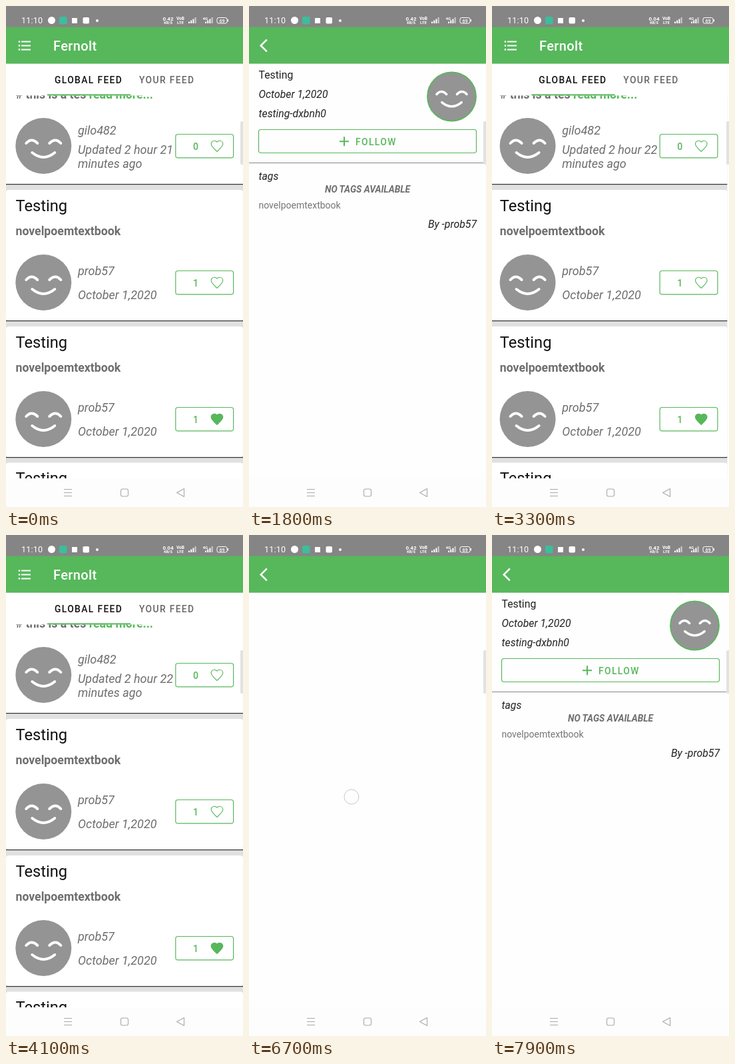
Animation of 356x752 px, one loop 8 s. Source, as an HTML page:

```html
<!DOCTYPE html>
<html lang="en">
<head>
<meta charset="utf-8">
<title>Feed</title>
<style>
  html, body { margin: 0; width: 100%; height: 100%; overflow: hidden; background: #fefefe; }
  svg { display: block; width: 356px; height: 752px; font-family: Roboto, Arial, sans-serif; }
  .i { font-style: italic; }
  .b { font-weight: 700; }
  .m { font-weight: 500; }
</style>
</head>
<body>
<svg id="stage" viewBox="0 0 356 752" xmlns="http://www.w3.org/2000/svg"></svg>
<script>
const LOOP = 8000, STEP = 100;
const GREEN = '#57b75b', GREY = '#6e6e6e', INK = '#222';
const USER = 'prob57';

const text = (x, y, size, fill, str, cls = '', more = '') =>
  `<text x="${x}" y="${y}" font-size="${size}" fill="${fill}" class="${cls}" ${more}>${str}</text>`;
const rect = (x, y, w, h, fill, more = '') =>
  `<rect x="${x}" y="${y}" width="${w}" height="${h}" fill="${fill}" ${more}/>`;
const line = (d, stroke, width, more = '') =>
  `<path d="${d}" fill="none" stroke="${stroke}" stroke-width="${width}" ${more}/>`;
const circle = (x, y, r, fill, more = '') =>
  `<circle cx="${x}" cy="${y}" r="${r}" fill="${fill}" ${more}/>`;

const avatar = (x, y, k, ring = '') =>
  `<g transform="translate(${x} ${y}) scale(${k})">` + circle(0, 0, 42, '#949494', ring) +
  line('M-26-4Q-18-13-9-4M9-4Q18-13 26-4M-17 10Q0 24 17 10', '#fff', 4, 'stroke-linecap="round"') + '</g>';

const HEART = 'M12 20.3L10.6 19C5.4 14.4 2 11.3 2 7.5C2 4.4 4.4 2 7.5 2C9.2 2 10.9 2.8 12 4.1' +
  'C13.1 2.8 14.8 2 16.5 2C19.6 2 22 4.4 22 7.5C22 11.3 18.6 14.4 13.4 19Z';

// Like button; the ripple grows from the touch point inside the button.
const likeButton = (id, y) =>
  `<clipPath id="clip-${id}">${rect(255, y, 87, 35.5, '#000', 'rx="4"')}</clipPath>` +
  `<g clip-path="url(#clip-${id})">${circle(309, y + 17, 0, GREEN, `id="ripple-${id}" opacity=".14"`)}</g>` +
  rect(254.8, y, 86.8, 35.4, 'none', `rx="3.5" stroke="${GREEN}" stroke-width="1.2"`) +
  text(285, y + 23, 14, GREEN, '', 'm', `id="count-${id}" text-anchor="middle"`) +
  `<path id="heart-${id}" d="${HEART}" transform="translate(306.4 ${y + 8}) scale(.88)" stroke="${GREEN}" stroke-width="1.3"/>`;

const title = y => text(14.5, y + 31.5, 23.7, '#111', 'Testing');

const card = (id, y) =>
  rect(0, y, 356, 196, '#fff', 'rx="4"') + title(y) +
  text(14.5, y + 67.5, 17.7, GREY, 'novelpoemtextbook', 'b') +
  avatar(56.3, y + 139, 1) +
  text(108, y + 128, 18, GREY, USER, 'i') +
  text(108, y + 164, 18, GREY, 'October 1,2020', 'i') +
  likeButton(id, y + 121.5) +
  rect(0, y + 196, 356, 1.2, '#333');

const feed =
  rect(0, 87, 356, 623, '#e0e0e0') +
  rect(0, 87, 356, 180, '#fff') +
  text(14.5, 138.5, 17.7, GREY, `# this is a tes <tspan fill="${GREEN}">read more...</tspan>`, 'b') +
  avatar(56.3, 210, 1) +
  text(108, 192.5, 18, GREY, 'gilo482', 'i') +
  text(108, 221.5, 18, GREY, '', 'i', 'id="age"') +
  text(108, 242.5, 18, GREY, 'minutes ago', 'i') +
  likeButton('a', 192.5) +
  rect(0, 267, 356, 1.2, '#333') +
  card('b', 276) + card('c', 481) +
  rect(0, 685.5, 356, 60, '#fff', 'rx="4"') + title(685.5) +
  rect(0, 87, 356, 47.4, '#fff') +
  text(73, 116, 13.8, '#111', 'GLOBAL FEED', 'm', 'letter-spacing="1.38"') +
  text(200, 116, 13.8, '#666', 'YOUR FEED', 'm', 'letter-spacing="1.38"') +
  rect(62, 132.4, 125, 2, GREEN);

const detail =
  text(14.5, 109, 15.8, INK, 'Testing') +
  text(14.5, 138, 15.8, INK, 'October 1,2020', 'i') +
  text(14.5, 167, 15.8, INK, 'testing-dxbnh0', 'i') +
  avatar(304.5, 136, .87, `stroke="${GREEN}" stroke-width="2"`) +
  rect(14.5, 185.5, 327, 35, 'none', `rx="3.5" stroke="${GREEN}" stroke-width="1.2"`) +
  line('M136 203.3H150M143 196.3V210.3', GREEN, 2) +
  text(160, 208.7, 13.8, GREEN, 'FOLLOW', 'm', 'letter-spacing="1.4"') +
  rect(0, 235, 356, 1, '#888') +
  text(14.5, 261, 15.8, INK, 'tags', 'i') +
  text(178, 280, 13.8, GREY, 'NO TAGS AVAILABLE', 'b i', 'text-anchor="middle"') +
  text(14.5, 304, 14, '#757575', 'novelpoemtextbook') +
  text(342, 333, 15.8, INK, 'By -' + USER, 'i', 'text-anchor="end"');

const bars = x => [2.5, 4.5, 6.5, 9].map((h, i) => rect(x + i * 3.2, 26 - h, 2, h, '#fff', i > 2 ? 'opacity=".6"' : '')).join('');

const statusBar =
  rect(0, 0, 356, 31.6, '#858585') +
  text(23, 26, 12.6, '#fff', '11:10', '', 'letter-spacing=".2"') +
  circle(68.5, 21.5, 5.5, '#fff') +
  rect(80, 16, 11.5, 11.5, '#3dbd9c', 'rx="2"') +
  rect(99, 18, 8, 8, '#fff') +
  rect(115.5, 17, 9.5, 9.5, '#fff', 'rx="2"') +
  circle(137, 22, 2, '#fff') +
  text(243.5, 21.5, 8, '#fff', '', 'b', 'id="speed" text-anchor="middle"') +
  text(243.5, 27.3, 5.6, '#fff', 'KB/S', 'b', 'text-anchor="middle"') +
  text(262, 21.3, 6.6, '#fff', 'VoB', 'b', 'text-anchor="middle"') +
  text(262, 27.3, 6.2, '#fff', 'LTE', 'b', 'text-anchor="middle"') +
  bars(274) + text(295.5, 21, 6, '#fff', '4G', 'b') + bars(299) +
  rect(317, 17.5, 15, 8.5, 'none', 'rx="2.5" stroke="#fff"') +
  rect(332.5, 20, 1.5, 3.5, '#fff') +
  text(324.5, 24.6, 7.2, '#fff', '69', 'm', 'text-anchor="middle"');

const header =
  rect(0, 31, 356, 55.6, GREEN) +
  `<g id="menu">` +
  line('M20 53.6h.01M20 59.5h.01M20 65.4h.01', '#fff', 2.8, 'stroke-linecap="round"') +
  line('M23 53.6H37M23 59.5H37M23 65.4H37', '#fff', 2) +
  text(71, 67, 20, '#fff', 'Fernolt', 'm', 'letter-spacing=".4"') + '</g>' +
  `<g id="back">` + circle(28, 59, 20, '#fff', 'id="press" opacity=".2"') +
  line('M26.8 50.5L17.8 59.4L26.8 68.3', '#fff', 2.6) + '</g>';

const navBar =
  rect(0, 709, 356, 43, '#fdfdfd') +
  line('M87 725.5H99M87 730.5H99M87 735.5H99', '#aaa', 1.1) +
  rect(172.5, 725, 11, 11, 'none', 'rx="2.5" stroke="#aaa" stroke-width="1.1"') +
  line('M267.5 724.5V736.5L256.5 730.5Z', '#aaa', 1.1, 'stroke-linejoin="round"');

const stage = document.getElementById('stage');
stage.innerHTML =
  rect(0, 0, 356, 752, '#fefefe') +
  `<g id="detail"><g id="content">${detail}</g></g><g id="feed">${feed}</g>` +
  rect(352, 173, 6, 65, '#e2e2e2', 'rx="2"') +
  circle(0, 0, 11, 'none', 'id="touch" stroke="#c8c8c8"') +
  header + statusBar + navBar;

const el = {};
stage.querySelectorAll('[id]').forEach(n => el[n.id] = n);

// Horizontal place of the feed: it leaves to the right and returns from the left.
const SLIDE = [[0, 0], [1000, 0], [1100, 49], [1200, 234], [1300, 350], [1400, 356],
  [3000, 356], [3100, -90], [3200, -17], [3300, -2.7], [3400, 0],
  [6500, 0], [6600, 331], [6700, 356], [8000, 356]];
// start, end, x, y, opacity
const TOUCHES = [[1000, 1300, 254, 303, .8], [1300, 1500, 254, 303, .3], [4200, 4500, 309, 207, .8],
  [5200, 5500, 309, 412, .8], [6500, 6800, 154, 393, 1]];

const within = (t, a, b) => t >= a && t < b;
const show = (node, on) => node.setAttribute('visibility', on ? 'visible' : 'hidden');

function at(keys, t) {
  const n = keys.findIndex(k => k[0] > t);
  const [t0, a] = keys[n - 1], [t1, b] = keys[n];
  return a + (b - a) * (t - t0) / (t1 - t0);
}

function like(id, count, on, t, start) {
  el['count-' + id].textContent = count;
  el['heart-' + id].setAttribute('fill', on ? GREEN : 'none');
  const p = (t - start) / 300;
  el['ripple-' + id].setAttribute('r', p >= 0 && p < 1.3 ? 26 + 60 * p : 0);
}

function draw(t) {
  const x = at(SLIDE, t);
  const reading = within(t, 1100, 3100) || t >= 6600;
  el.feed.setAttribute('transform', `translate(${x} 0)`);
  el.detail.setAttribute('transform', `translate(${x > 0 ? x - 356 : x + 356} 0)`);
  show(el.feed, x < 356);
  show(el.content, within(t, 1700, 3400) || t >= 7200);
  show(el.menu, !reading);
  show(el.back, reading);
  show(el.press, within(t, 2800, 3100));
  el.age.textContent = 'Updated 2 hour ' + (t < 3000 ? 21 : 22);
  el.speed.textContent = within(t, 2200, 5900) ? '0.04' : '0.42';
  like('a', t < 4500 ? 0 : 1, t >= 4500, t, 4200);
  like('b', t < 5600 ? 1 : 2, t >= 5600, t, 5200);
  like('c', 1, true, t, LOOP);
  const tap = TOUCHES.find(k => within(t, k[0], k[1]));
  el.touch.setAttribute('opacity', tap ? tap[4] : 0);
  if (tap) el.touch.setAttribute('transform', `translate(${tap[2]} ${tap[3]})`);
}

const begin = performance.now();
function tick() {
  const t = (performance.now() - begin) % LOOP;
  draw(Math.floor(t / STEP) * STEP);
  requestAnimationFrame(tick);
}
tick();
</script>
</body>
</html>
```
